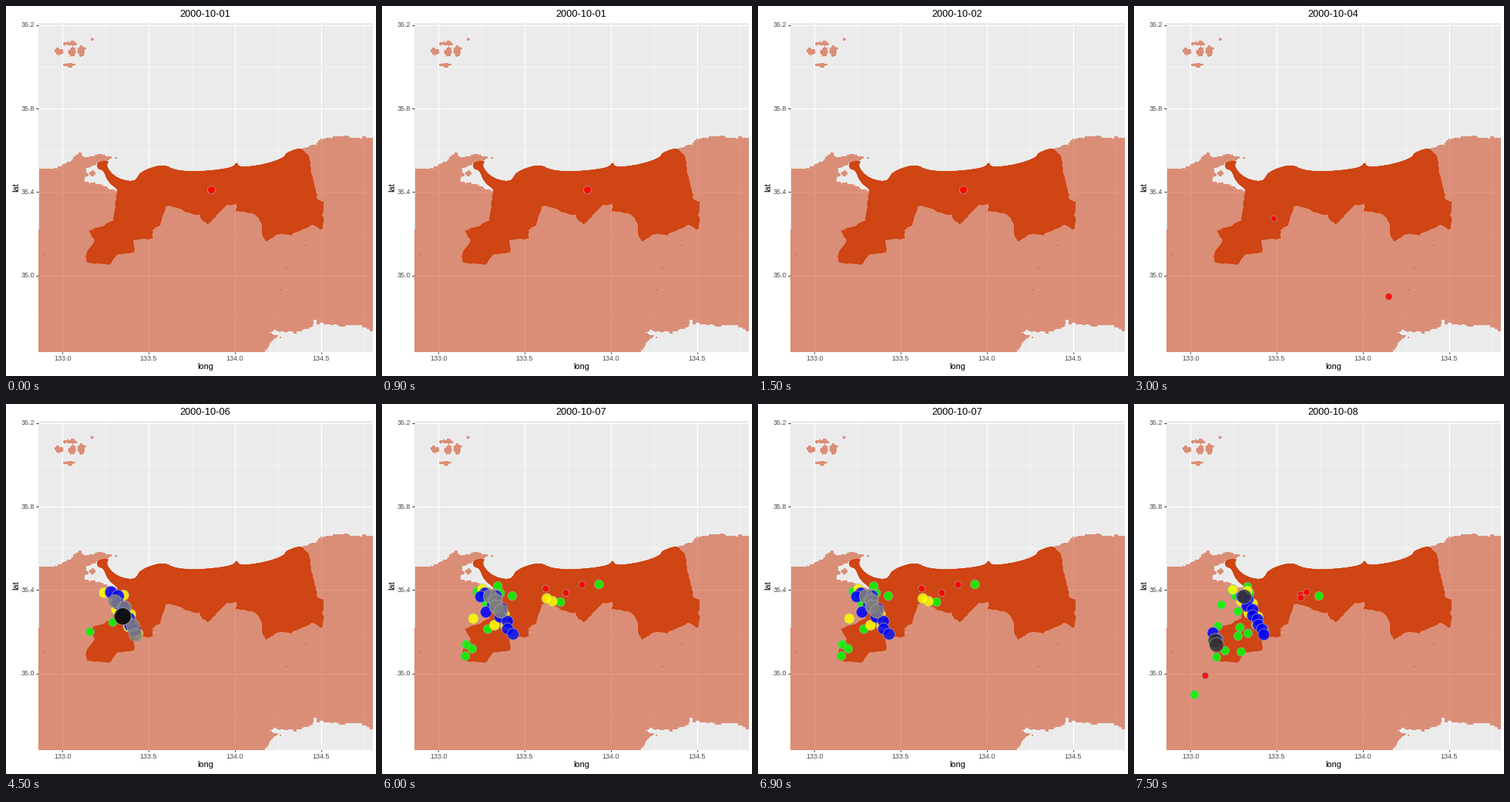
These frames come from a looping animation (480x480 px, 8 s). A matplotlib script:

```python
import numpy as np
import matplotlib.pyplot as plt
from matplotlib.animation import FuncAnimation
from matplotlib.patches import Polygon, Rectangle

SIZE, DPI, STEP_MS = 480, 100, 500
LEFT, RIGHT, TOP, BOTTOM = 42, 475.5, 21.5, 448.5
PT = 72 / DPI
PALE, DEEP = "#cd390e", "#cd3700"
RED, GREEN, YELLOW, BLUE = "#ff0000", "#00ff00", "#ffff00", "#0000ff"
GRAY, DARK, BLACK = "#7f7f7f", "#333333", "#000000"

plt.rcParams["font.family"] = "Liberation Sans"
rng = np.random.default_rng(7)

# Key points of the outlines, in stage pixels; rough() and smooth() add detail
COAST_WEST = [(42, 212), (66, 211), (82, 203), (96, 190), (103, 197),
              (127, 194), (146, 197), (118, 204), (103, 211), (107, 220),
              (102, 228), (125, 233), (142, 240), (145, 238)]
SHORE = [(145, 238), (132, 227), (127, 213), (119, 211), (118, 203),
         (134, 200), (129, 208), (143, 224), (168, 229), (174, 215),
         (204, 205), (220, 214), (255, 215), (295, 210), (299, 202),
         (302, 210), (335, 206), (361, 197), (363, 191), (379, 185),
         (384, 186)]
COAST_EAST = [(384, 186), (400, 181), (415, 171), (475, 171)]
COAST_SOUTH = [(475, 421), (450, 414), (404, 412), (402, 405), (399, 413),
               (376, 424), (337, 422), (358, 431), (346, 434), (336, 448)]
BORDER = [(384, 186), (391, 193), (398, 226), (403, 251), (412, 254),
          (412, 276), (409, 290), (397, 283), (370, 297), (357, 295),
          (337, 305), (332, 283), (319, 268), (298, 266), (299, 256),
          (286, 258), (276, 268), (262, 283), (252, 270), (207, 259),
          (200, 284), (190, 290), (190, 301), (164, 303), (166, 319),
          (144, 322), (134, 335), (105, 332), (105, 320), (115, 306),
          (108, 292), (140, 279), (144, 250), (145, 238)]
# Islets: centre, half width, half height
ISLETS = [(69, 59, 6, 5), (83, 49, 10, 3), (97, 58, 5, 8), (86, 59, 6, 5),
          (82, 76, 7, 3), (111, 43, 2, 2), (112, 217, 3.5, 4)]
SPECKS = [(49, 322), (388, 310), (363, 340), (355, 368)]


def rough(points, amp=0.1):
    """Break a line up by repeated midpoint displacement."""
    line = np.array(points, float)
    for _ in range(4):
        a, b = line[:-1], line[1:]
        reach = np.minimum(np.hypot(*(b - a).T), 14)[:, None]
        mid = (a + b) / 2 + rng.normal(0, amp, a.shape) * reach
        line = np.vstack([np.stack([a, mid], 1).reshape(-1, 2), line[-1:]])
    return line


def smooth(points):
    """Round a line off by cutting its corners."""
    line = np.array(points, float)
    for _ in range(3):
        a, b = line[:-1], line[1:]
        cut = np.stack([0.75 * a + 0.25 * b, 0.25 * a + 0.75 * b], 1)
        line = np.vstack([line[:1], cut.reshape(-1, 2), line[-1:]])
    return line


def stairs(line, grid=1.5):
    line = np.round(np.asarray(line) / grid) * grid
    corners = np.column_stack([line[1:, 0], line[:-1, 1]])
    return np.stack([corners, line[1:]], 1).reshape(-1, 2)


def blob(x, y, w, h):
    a = np.linspace(0, 2 * np.pi, 9)
    r = rng.uniform(0.8, 1.2, 9)
    r[-1] = r[0]
    return stairs(rough(np.column_stack([x + w * r * np.cos(a),
                                         y + h * r * np.sin(a)]), 0.15))


def along_fault(n, start, end, spread):
    """Centres along the fault, swapping sides and closing in southwards."""
    t = np.linspace(start, end, n)
    side = spread * (1 - 0.8 * t) * (-1.0) ** np.arange(1, n + 1)
    return list(zip(139 + 30 * t + 0.9 * side, 243 + 56 * t - 0.4 * side))


# Dots per day: colour, radius, centres; listed from back to front
OCT_1 = [(RED, 5.1, [(266, 237.5)])]
OCT_4 = [(RED, 4, [(181.5, 276)]), (RED, 4.6, [(330.5, 377)])]
OCT_6 = [
    (GREEN, 5.5, [(109, 295.5), (138.5, 283)]),
    (YELLOW, 7, along_fault(6, -0.05, 1, 11)),
    (BLUE, 8, along_fault(8, 0, 0.9, 3)),
    (GRAY, 8.5, along_fault(5, 0.2, 1, 5)),
    (BLACK, 11, [(151.5, 275.5)]),
]
OCT_7 = [
    (RED, 4.5, [(212.5, 239.5), (238.5, 245), (259.5, 234.5)]),
    (GREEN, 5.8, along_fault(5, -0.1, 0.2, 13) + [
        (169, 249), (137.5, 292), (109.5, 312), (108, 327), (117, 317.5),
        (231.5, 257), (281.5, 234)]),
    (YELLOW, 6.8, along_fault(6, -0.1, 1, 6) + [
        (118.5, 278.5), (146, 287), (221, 256), (214, 252.5)]),
    (BLUE, 7.5, along_fault(8, 0, 1, 6) + [(128, 250), (135, 270)]),
    (GRAY, 9, along_fault(4, 0.1, 0.47, 2)),
]
OCT_8 = [
    (RED, 4.4, [(216, 247.5), (224, 244), (216.5, 251.5), (92.5, 352.5)]),
    (GREEN, 5.6, along_fault(4, -0.1, 0.1, 10) + [
        (78.5, 377), (113.5, 260.5), (109, 288), (107, 328.5), (118, 320),
        (139, 321.5), (135, 301), (148, 297.5), (137.5, 290), (135, 269),
        (240, 249)]),
    (YELLOW, 6.5, along_fault(8, -0.1, 0.9, 8)),
    (BLUE, 7.5, along_fault(9, 0.1, 1, 3) + [(102.5, 297), (108, 305)]),
    (DARK, 9.4, [(105.5, 307), (143, 250), (107, 312.5)]),
]
# Day of the month, steps on screen, dots
DAYS = [(1, 3, OCT_1), (2, 3, OCT_1), (4, 3, OCT_4),
        (6, 3, OCT_6), (7, 3, OCT_7), (8, 1, OCT_8)]
SCHEDULE = [(day, dots) for day, steps, dots in DAYS for _ in range(steps)]

fig = plt.figure(figsize=(SIZE / DPI, SIZE / DPI), dpi=DPI, facecolor="white")
ax = fig.add_axes([0, 0, 1, 1])
ax.set(xlim=(0, SIZE), ylim=(SIZE, 0))
ax.axis("off")


def label(x, y, text, px, color="black", **style):
    return ax.text(x, y, text, fontsize=px * PT, color=color, **style)


def line(xs, ys, color, width):
    ax.plot(xs, ys, color=color, lw=width * PT, zorder=1,
            solid_capstyle="butt")


# Panel, grid, ticks and their labels
ax.add_patch(Rectangle((LEFT, TOP), RIGHT - LEFT, BOTTOM - TOP,
                       fc="#ebebeb", lw=0))
X0, DX, Y0, DY = 73.2, 111.8, 24.6, 108.4
for i in range(4):
    x, y = X0 + i * DX, Y0 + i * DY
    for shift, width in ((0.5, 0.55), (0, 1.1)):
        gx, gy = x + shift * DX, y + shift * DY
        line([gx, gx], [TOP, BOTTOM], "white", width)
        line([LEFT, RIGHT], [gy, gy], "white", width)
    line([x, x], [BOTTOM, BOTTOM + 2.7], "#333333", 1.07)
    line([LEFT - 2.7, LEFT], [y, y], "#333333", 1.07)
    label(x, 460, f"{133 + i / 2:.1f}", 9, "#4d4d4d", ha="center")
    label(37.5, y + 2.6, f"{36.2 - 0.4 * i:.1f}", 9, "#4d4d4d", ha="right")

# Land, then the highlighted region on top of it
shore = smooth(SHORE)
mainland = np.vstack([
    stairs(rough(COAST_WEST)), shore, stairs(rough(COAST_EAST)),
    [(RIGHT, 171), (RIGHT, 421)], stairs(rough(COAST_SOUTH)),
    [(336, BOTTOM), (LEFT, BOTTOM)],
])
for shape in [mainland] + [blob(*islet) for islet in ISLETS]:
    ax.add_patch(Polygon(shape, fc=PALE, alpha=0.52, lw=0,
                         antialiased=False, zorder=2))
for spot in SPECKS:
    ax.add_patch(Rectangle(spot, 1.5, 1, fc=DEEP, alpha=0.7, lw=0, zorder=3))
region = np.vstack([shore, rough(BORDER, 0.07)])
ax.add_patch(Polygon(region, fc=DEEP, ec=DEEP, alpha=0.84, lw=0.8 * PT,
                     zorder=3))

label(258.5, 471.2, "long", 11, ha="center")
label(13, 235, "lat", 11, ha="center", va="center", rotation=90)
title = label(257.8, 14.3, "", 12.7, ha="center")
points = ax.scatter([], [], alpha=0.86, zorder=5)
points.set_edgecolor("#a6a6a6")
points.set_linewidth(0.8 * PT)


def draw(step):
    day, dots = SCHEDULE[step]
    title.set_text(f"2000-10-{day:02d}")
    flat = [(c, r, p) for c, r, centres in dots for p in centres]
    points.set_offsets([p for _, _, p in flat])
    points.set_sizes([(2 * r * PT) ** 2 for _, r, _ in flat])
    points.set_facecolor([c for c, _, _ in flat])
    return title, points


anim = FuncAnimation(fig, draw, frames=len(SCHEDULE), interval=STEP_MS,
                     init_func=lambda: draw(0), repeat=True, repeat_delay=0)
plt.show()
```
